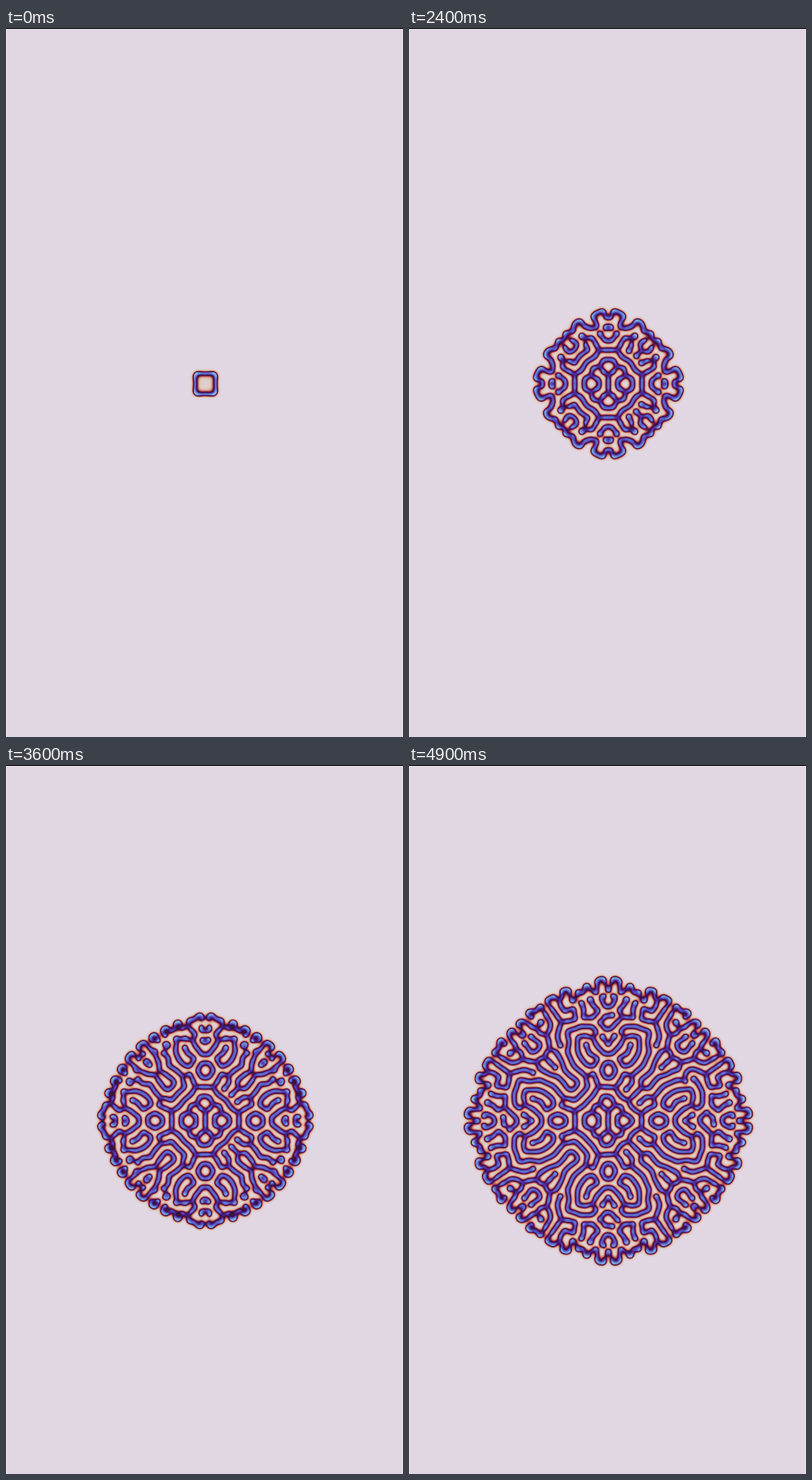
Animation, 461 px wide and 822 px high, one loop 5000 ms. Source, as an HTML page with a canvas:

```html
<!DOCTYPE html>
<html lang="en">
<head>
<meta charset="utf-8">
<title>Reaction-diffusion growth</title>
<style>
  html, body { margin: 0; width: 100%; height: 100%; overflow: hidden; background: #e1d7e3; }
  canvas { display: block; width: 100%; height: 100%; }
</style>
</head>
<body>
<canvas id="stage" width="461" height="822"></canvas>
<script>
const ctx = document.getElementById('stage').getContext('2d');
const LOOP = 5000, TICK = 100, FRAMES = LOOP / TICK;
const CX = 231, CY = 412;

// Gray-Scott model on a square grid, one cell per pixel
const HALF = 190, N = HALF * 2 + 1;
const DU = 0.15, DV = 0.075, FEED = 0.037, KILL = 0.06;
const SEED_HALF = 9, START_RADIUS = 15, END_RADIUS = 169;
const CHUNK = 25, MAX_CHUNKS = 600;
const V_EDGE = 0.03, V_MAX = 0.45;

// Cyclic palette, indexed by the concentration of v
const STOPS = ('e1d7e3 dccbc6 dcb8a4 d49a80 c67566 b85657 a23a4e 88254c 6a1545 480f3a 2f1436 ' +
  '3e1666 4c2394 5840b0 5c62c2 6482cc 7096cc 8aabcb a9bfcd ccd4d8 e1d7e3')
  .split(' ').map(h => [0, 2, 4].map(i => parseInt(h.substr(i, 2), 16)));

const palette = Array.from({ length: 256 }, (_, i) => {
  const x = i / 255 * (STOPS.length - 1);
  const k = Math.min(Math.floor(x), STOPS.length - 2);
  return STOPS[k].map((c, j) => Math.round(c + (STOPS[k + 1][j] - c) * (x - k)));
});

function makeRandom(seed) {
  return () => (seed = (seed * 16807) % 2147483647) / 2147483647;
}

let u = new Float32Array(N * N).fill(1), v = new Float32Array(N * N);
let nextU = u.slice(), nextV = v.slice();

function plantSeed() {
  const random = makeRandom(71);
  for (let y = -SEED_HALF; y <= SEED_HALF; y++) {
    for (let x = -SEED_HALF; x <= SEED_HALF; x++) {
      v[(y + HALF) * N + x + HALF] = 1 - 0.01 * random();
    }
  }
}

// Nine-point Laplacian, equally fast in all directions
function laplace(f, i) {
  const sides = f[i - 1] + f[i + 1] + f[i - N] + f[i + N];
  const corners = f[i - N - 1] + f[i - N + 1] + f[i + N - 1] + f[i + N + 1];
  return (4 * sides + corners - 20 * f[i]) / 6;
}

function step(reach) {
  const lo = Math.max(1, HALF - reach), hi = Math.min(N - 2, HALF + reach);
  for (let y = lo; y <= hi; y++) {
    for (let i = y * N + lo, end = y * N + hi; i <= end; i++) {
      const a = u[i], b = v[i], react = a * b * b;
      nextU[i] = a + DU * laplace(u, i) - react + FEED * (1 - a);
      nextV[i] = b + DV * laplace(v, i) + react - (FEED + KILL) * b;
    }
  }
  [u, nextU] = [nextU, u];
  [v, nextV] = [nextV, v];
}

// Mean half-size of the box around the visible pattern
function measure() {
  let x0 = N, x1 = 0, y0 = N, y1 = 0;
  for (let y = 0, i = 0; y < N; y++) {
    for (let x = 0; x < N; x++, i++) {
      if (v[i] > V_EDGE) {
        if (x < x0) x0 = x;
        if (x > x1) x1 = x;
        if (y < y0) y0 = y;
        y1 = y;
      }
    }
  }
  return (x1 - x0 + y1 - y0 + 2) / 4;
}

function snapshot() {
  const shot = new Uint8Array(N * N);
  for (let i = 0; i < shot.length; i++) {
    shot[i] = Math.min(255, Math.round(v[i] / V_MAX * 255));
  }
  return shot;
}

// Grow to the final radius, then spread the frames evenly over the steps taken
function grow() {
  const shots = [];
  let radius = SEED_HALF;
  plantSeed();
  for (let c = 1; c <= MAX_CHUNKS && radius < END_RADIUS; c++) {
    const reach = Math.ceil(radius) + 16;
    for (let s = 0; s < CHUNK; s++) step(reach);
    radius = measure();
    if (shots.length || (c * CHUNK >= 100 && radius >= START_RADIUS)) shots.push(snapshot());
  }
  const last = shots.length - 1;
  return Array.from({ length: FRAMES }, (_, n) => shots[Math.round(last * n / (FRAMES - 1))]);
}

function drawBackdrop() {
  const bar = (color, x, y, w, h) => { ctx.fillStyle = color; ctx.fillRect(x, y, w, h); };
  bar('#e1d7e3', 0, 0, 461, 822);
  bar('#e7e2e8', 0, 0, 1, 822);
  bar('#e7e2e8', 460, 0, 1, 822);
  bar('#000', 0, 0, 461, 1);
}

const frames = grow();
const image = ctx.createImageData(N, N);
let shown = -1;

function draw(time) {
  const n = Math.floor((time % LOOP) / TICK);
  if (n === shown) return;
  shown = n;
  const shot = frames[n], px = image.data;
  for (let i = 0, p = 0; i < shot.length; i++, p += 4) {
    const c = palette[shot[i]];
    px[p] = c[0];
    px[p + 1] = c[1];
    px[p + 2] = c[2];
    px[p + 3] = 255;
  }
  ctx.putImageData(image, CX - HALF, CY - HALF);
}

drawBackdrop();
draw(0);
const start = performance.now();
(function loop() {
  draw(Math.max(0, performance.now() - start));
  requestAnimationFrame(loop);
})();
</script>
</body>
</html>
```
